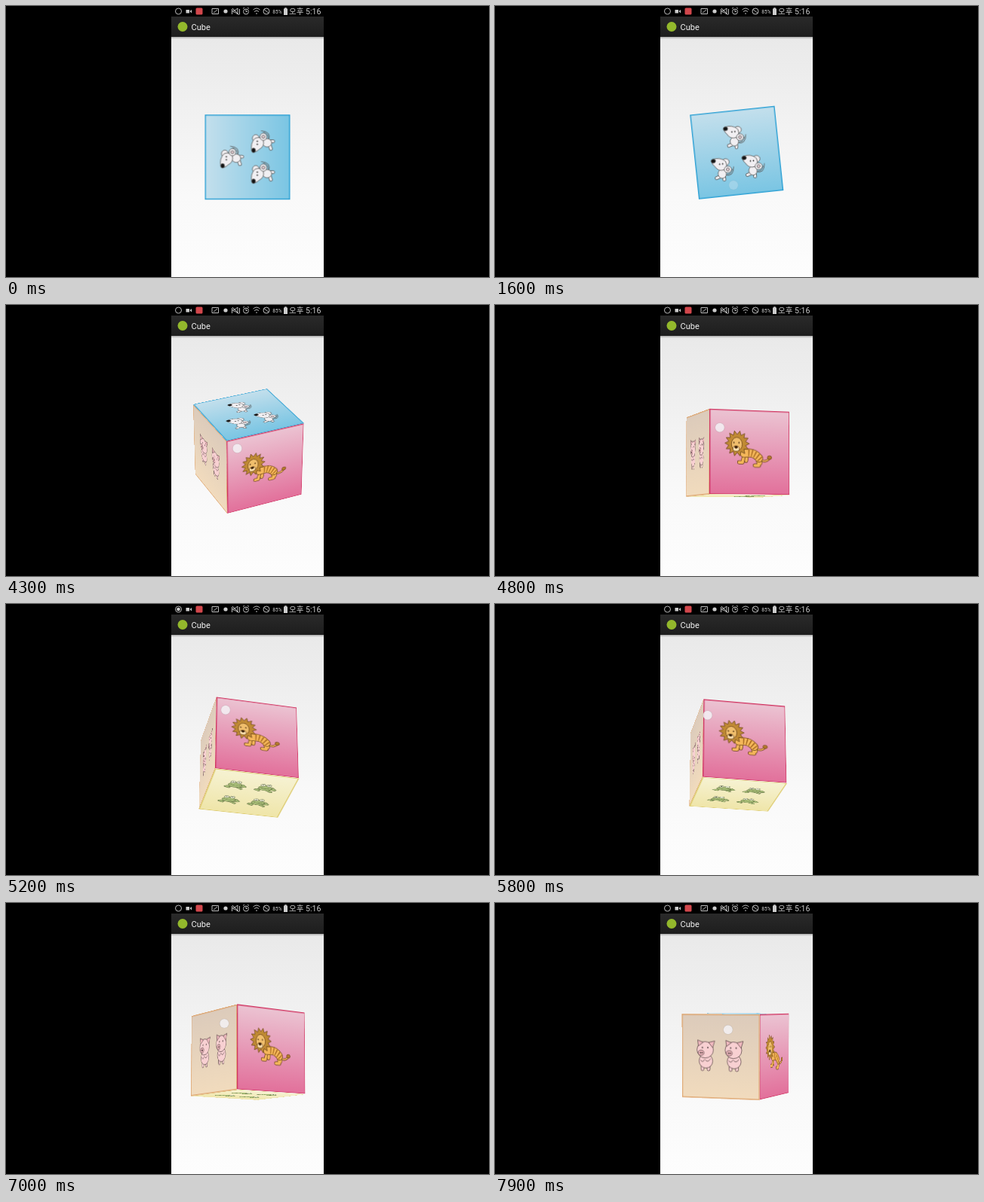
Recreate the animation shown at these times as an HTML page. Size 640 by 360 pixels, loop 8 s.

```html
<!DOCTYPE html>
<html lang="ko">
<head>
<meta charset="utf-8">
<title>Cube</title>
<style>
html, body { margin: 0; width: 100%; height: 100%; overflow: hidden; background: #000; }
#stage { position: absolute; left: 0; top: 0; width: 640px; height: 360px; overflow: hidden; }
#screen { position: absolute; left: 0; top: 0; }
#scene { position: absolute; inset: 0; perspective: 1356px; perspective-origin: 320px 200.5px; }
#cube { position: absolute; left: 320px; top: 200.5px; width: 0; height: 0; transform-style: preserve-3d; }
.face { position: absolute; left: -54.25px; top: -54.25px; width: 108.5px; height: 108.5px; backface-visibility: hidden; }
.face svg { display: block; width: 100%; height: 100%; }
#dot { position: absolute; left: -6px; top: -6px; width: 12px; height: 12px; border-radius: 50%;
  background: #f4f1f5; box-shadow: 0 0 1px #999; }
</style>
</head>
<body>
<div id="stage">
<svg id="screen" width="640" height="360" font-family="Roboto, 'Noto Sans CJK KR', 'Noto Sans CJK', sans-serif" fill="#ccc">
  <defs>
    <linearGradient id="page" x2="0" y2="1"><stop stop-color="#e6e6e6"/><stop offset=".7" stop-color="#f9f9f9"/><stop offset="1" stop-color="#fdfdfd"/></linearGradient>
    <linearGradient id="bar" x2="0" y2="1"><stop stop-color="#2a2a2a"/><stop offset="1" stop-color="#1d1d1d"/></linearGradient>
    <linearGradient id="shade" x2="0" y2="1"><stop stop-color="#aaa"/><stop offset="1" stop-color="#aaa" stop-opacity="0"/></linearGradient>
  </defs>
  <rect x="219" width="202" height="360" fill="url(#page)"/>
  <rect x="219" width="202" height="14"/>
  <rect x="219" width="202" height="14" fill="#000"/>
  <rect x="219" y="14" width="202" height="27" fill="url(#bar)"/>
  <rect x="219" y="41" width="202" height="3" fill="url(#shade)"/>
  <circle cx="234" cy="27.5" r="6.5" fill="#93b82c"/>
  <text x="245.5" y="31.8" font-size="11" fill="#f3f3f3">Cube</text>

  <g fill="none" stroke="#bbb">
    <circle cx="228.5" cy="7" r="4"/>
    <path d="M273 3.500h8.500v7h-8.500zM275 9l5-4"/>
    <path d="M299.500 4v7M309.500 4v7M301 6h2l4-3v8l-4-3h-2zM300 3l9 9"/>
    <circle cx="318" cy="7.500" r="3.500"/><path d="M318 5v2.500h2M314 3.500l2-1.500M322 3.500l-2-1.500"/>
    <path d="M327.500 5q4.500-4 9 0M329 7.500q3-3 6 0M331 10h2"/>
    <circle cx="345" cy="7" r="4"/><path d="M342 4.500l6 5"/>
  </g>
  <circle id="rec" cx="228.5" cy="7" r="2.3"/>
  <path d="M238.500 5h4.500v4.500h-4.500zM243.500 7l2.500-2v4.500z"/>
  <rect x="251.500" y="2.500" width="9" height="9" rx="1.500" fill="#d2474c"/>
  <circle cx="291" cy="7" r="2.600"/>
  <text x="353.300" y="10" font-size="6.600">85%</text>
  <path d="M368 3.500h1.200v-1.200h2.600v1.200h1.200v8.500h-5z"/>
  <text x="417.500" y="11" font-size="10.600" text-anchor="end">오후 5:16</text>
</svg>
<div id="scene"><div id="cube"></div></div>
<div id="dot"></div>
</div>
<script>
const $ = id => document.getElementById(id);

const oval = (x, y, rx, ry, fill) => `<ellipse cx="${x}" cy="${y}" rx="${rx}" ry="${ry}" fill="${fill}"/>`;
const shape = (d, fill = 'none') => `<path d="${d}" fill="${fill}"/>`;
const line = (d, width, color) => `<path d="${d}" fill="none" stroke="${color}" stroke-width="${width}" stroke-linecap="round"/>`;
const tube = (d, width, color) => line(d, width + 1.6, 'currentColor') + line(d, width, color);
const eyes = (x, y, gap) => oval(x, y, .6, .8, '#222') + oval(x + gap, y, .6, .8, '#222');

function mane(x, y, count) {
  const tips = Array.from({ length: 2 * count }, (_, i) => {
    const a = i * Math.PI / count, r = i % 2 ? 12 : 17;
    return [x + r * Math.cos(a), y + r * Math.sin(a)].map(v => v.toFixed(1));
  });
  return shape(`M${tips.join('L')}z`, '#c08a34');
}

const tan = '#f5b75a', pink = '#f8d0d2', white = '#f1eff2', green = '#a9bf78';
const lion = tube('M15 11q7 5 14-3', 1.4, tan) + oval(28, 8, 3, 2.4, '#b97c2c')
  + tube('M-8 5l-2 10h-5M-4 7l-1 6M11 11l2 8h-6M15 10v6', 3.6, tan)
  + tube('M-8 3Q6 0 13 9', 10, tan)
  + `<path d="M-2 2Q8 2 16 12" fill="none" stroke="#a86a22" stroke-width="9" stroke-dasharray="1.5 3"/>`
  + mane(-17.5, -10, 14) + oval(-18, -9, 7.5, 9, '#f0be6c') + oval(-19, -3, 4.5, 3.5, '#fae0b0')
  + oval(-19, -5, 2.2, 1.5, '#2a1608') + eyes(-22, -11, 7);

const pig = tube('M-5 12v7M4 12v7', 3.5, pink) + oval(0, 8, 10, 9.5, pink) + oval(-1, -7, 12, 11, pink)
  + shape('M-11-12l-1-8l8 3zM4-17l9-2l-3 9z', '#f0b9bf') + oval(-7, -3, 4.3, 3.4, '#f0b9bf')
  + eyes(-8, -3, 2.5) + eyes(-5, -10, 8) + shape('M-8 7q4 4 6-1M7 5q-5 6-8 1');

const mouse = shape('M3 9q11 4 12-10M3 9q9 0 10-7') + tube('M-3 10l-6 2M1 11l0 4', 3, white)
  + oval(-1, 7, 5.5, 6, white) + oval(5, -8, 4.8, 4.5, white)
  + shape('M-12-13q10-3 17 4q3 8-3 11q-8 2-12-6q-5-5-2-9z', white)
  + oval(7, 2, 4.8, 4.5, white) + oval(7, 2, 2, 2, '#e5ccd2') + eyes(-3, -6, 4) + oval(-11, -11, 2.9, 2.6, '#111');

const frog = tube('M-4 4l-9 3l5 2M4 4l9 0l-4-4M2 6l7 4', 2.5, green) + oval(-1, 1, 9, 6.5, green)
  + oval(-5, -6, 3.2, 3.2, '#f5f4df') + oval(3, -6, 3.2, 3.2, '#f5f4df') + eyes(-5, -6, 8) + shape('M-8 0q7 5 14 0');

// rows: how many animals stand in each row of the face
const faces = [
  { art: lion, ink: '#6b4318', turn: '', colors: ['#ebc3d2', '#e2709b', '#d0325f'], rows: [1] },
  { art: pig, ink: '#5d484a', turn: 'rotateY(-90deg)', colors: ['#dccbbb', '#f1dbbd', '#dda066'], rows: [2] },
  { art: mouse, ink: '#555', turn: 'rotateX(90deg)', colors: ['#c3dfec', '#7ac5e3', '#2ba0d4'], rows: [1, 2] },
  { art: frog, ink: '#56633a', turn: 'rotateX(-90deg)', colors: ['#f6f2d2', '#efe5a8', '#dac660'], rows: [2, 2] }
];
const spread = (i, count) => 56 + (i - (count - 1) / 2) * 41;
const herd = ({ art, rows }) => rows.map((count, r) => Array.from({ length: count }, (_, c) =>
  `<g transform="translate(${spread(c, count)} ${spread(r, rows.length) - 1})">${art}</g>`).join('')).join('');

$('cube').innerHTML = faces.map((face, i) => {
  const [light, deep, edge] = face.colors;
  return `<div class="face" style="transform:${face.turn} translateZ(54.25px)"><svg viewBox="0 0 113 113">
    <linearGradient id="tint${i}" x2="0" y2="1"><stop stop-color="${light}"/><stop offset="1" stop-color="${deep}"/></linearGradient>
    <rect x=".7" y=".7" width="111.6" height="111.6" fill="url(#tint${i})" stroke="${edge}" stroke-width="1.4"/>
    <g color="${face.ink}" stroke="currentColor" stroke-width=".8" stroke-linejoin="round">${herd(face)}</g>
  </svg></div>`;
}).join('');

// key poses of the cube; x is the finger, lift moves the cube up or down
const rest = { roll: 0, pitch: 0, yaw: 0, x: 316, lift: 0 };
const keys = [
  { t: 0, roll: -90, pitch: -90 },
  { t: 600, pitch: -90 },
  { t: 1200, pitch: -90 },
  { t: 1600, pitch: -90, roll: -6, lift: -6 },
  { t: 2000, pitch: -90 },
  { t: 2900 },
  { t: 3800 },
  { t: 4300, pitch: -30.5, yaw: 25, x: 306.5, lift: -9 },
  { t: 5200, pitch: 31.5, yaw: 13, x: 291, lift: 4 },
  { t: 6300, pitch: 15.5, yaw: 9.7, x: 274 },
  { t: 8000, pitch: -4, yaw: 71, x: 311 }
].map(key => ({ ...rest, ...key }));

function pose(t) {
  const i = keys.findIndex(k => k.t > t), a = keys[i - 1], b = keys[i];
  const p = (t - a.t) / (b.t - a.t);
  return Object.fromEntries(Object.keys(rest).map(k => [k, a[k] + (b[k] - a[k]) * p]));
}

function touch(t) {
  if (t > 3800) return .85;
  return t > 1200 && t < 2900 ? .25 : 0;
}

function draw(now) {
  const t = Math.floor(now % 8000 / 100) * 100; // ten pictures a second
  const { roll, pitch, yaw, x, lift } = pose(t);
  $('cube').style.transform = `translateY(${lift}px) rotateZ(${roll}deg) rotateX(${pitch}deg) rotateY(${yaw}deg)`;
  $('dot').style.transform = `translate(${x}px, ${166 - .8 * pitch}px)`; // the pitch follows the finger
  $('dot').style.opacity = touch(t);
  $('rec').style.opacity = t >= 4900 && t < 5500 ? 1 : 0;
  requestAnimationFrame(draw);
}
draw(performance.now());
</script>
</body>
</html>
```
